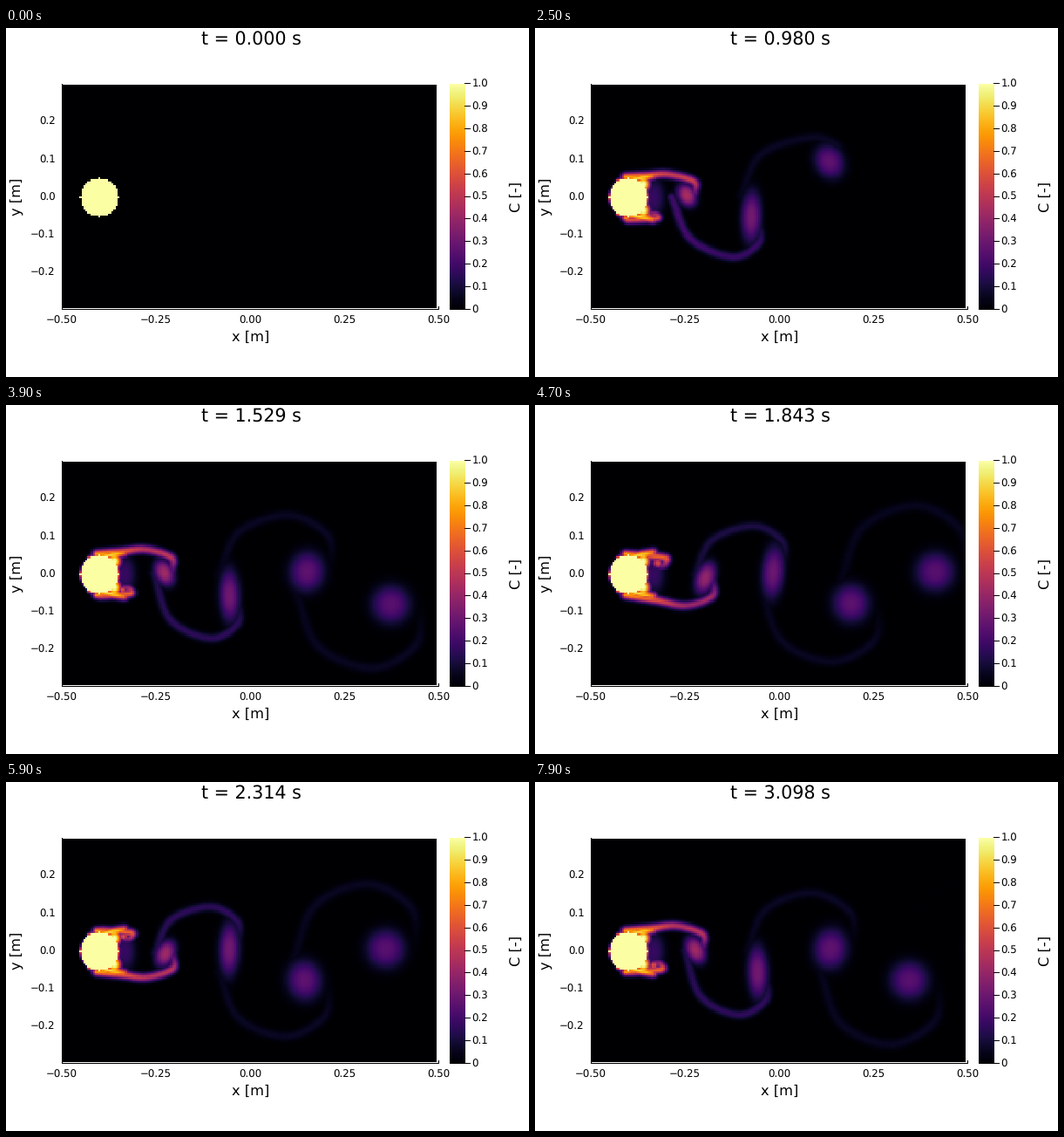
A matplotlib script for the animation above (8000 ms loop, 600x400 px).

```python
import numpy as np
import matplotlib.pyplot as plt
from matplotlib.animation import FuncAnimation

FRAMES, STEP = 80, 2 / 51
COLS, ROWS, CELL = 198, 118, 2.163
LEFT, TOP = 65.0, 65.3
CX, CY = LEFT + 19.5 * CELL, TOP + 59.5 * CELL
GX = LEFT + (np.arange(COLS) + 0.5) * CELL
GY = TOP + (np.arange(ROWS) + 0.5) * CELL
XX, YY = np.meshgrid(GX, GY)
BODY = np.round((XX - CX) / CELL) ** 2 + np.round((YY - CY) / CELL) ** 2 <= 100
GAP = np.maximum(np.hypot(XX - CX, YY - CY) - 21.5, 0)
HALO = 0.65 * np.exp(-GAP / (1.6 + 0.8 * np.tanh((XX - CX) / 12)))

FIRST, HALF_PERIOD, COUNT = 0.136, 0.257, 12
BIRTH_X, SPIN_UP = 128, 0.33


def lerp(a, b, w):
    return a + (b - a) * w


def ease(x, lo, hi):
    u = np.clip((x - lo) / (hi - lo), 0, 1)
    return u * u * (3 - 2 * u)


class Vortex:
    """Vortex n of the street; sides alternate and births are periodic."""

    def __init__(self, n):
        self.side = 1 if n % 2 == 0 else -1
        self.birth = FIRST + n * HALF_PERIOD
        self.speed = 390 - 17 * self.birth
        self.push = np.exp(-(self.birth / 0.2) ** 2)  # start-up kick

    def at(self, t):
        age = max(t - self.birth, 0)
        run = age - SPIN_UP * (1 - np.exp(-age / SPIN_UP))
        x = BIRTH_X + self.speed * run
        drift = ease(x, 170, 300)
        off = (24 * np.exp((BIRTH_X - x) / 20)
               + (18 + 60 * self.push) * drift)
        return np.array([x, CY - self.side * off + 15 * drift])


STREET = [Vortex(n) for n in range(COUNT)]


def catmull(pts, n):
    p = np.vstack([2 * pts[0] - pts[1], pts, 2 * pts[-1] - pts[-2]])
    a, b, c, d = (p[i:len(p) - 3 + i, None] for i in range(4))
    u = np.linspace(0, 1, n, endpoint=False)[None, :, None]
    q = b + 0.5 * u * (c - a + u * (2 * a - 5 * b + 4 * c - d
                                    + u * (3 * (b - c) + d - a)))
    return q.reshape(-1, pts.shape[1])


def stroke(field, pts, n=18):
    """Paint a soft line through rows of (x, y, strength, width)."""
    for x, y, a, w in catmull(np.array(pts, float), n):
        r = 3.2 * w
        i0, i1 = (max(0, int((v - LEFT) / CELL)) for v in (x - r, x + r))
        j0, j1 = (max(0, int((v - TOP) / CELL)) for v in (y - r, y + r))
        if a <= 0.003 or i0 >= COLS or j0 >= ROWS:
            continue
        gx = np.exp(-0.5 * ((GX[i0:i1 + 1] - x) / w) ** 2)
        gy = np.exp(-0.5 * ((GY[j0:j1 + 1] - y) / w) ** 2)
        part = field[j0:j1 + 1, i0:i1 + 1]
        np.maximum(part, a * gy[:, None] * gx, out=part)


def blob(field, x, y, a, w, h, tilt=0.0):
    s, c = np.sin(tilt), np.cos(tilt)
    dx, dy = XX - x, YY - y
    q = ((dx * c - dy * s) / w) ** 2 + ((dx * s + dy * c) / h) ** 2
    np.maximum(field, a * np.exp(-q ** 1.25), out=field)


def core(field, v, x, y, fade):
    """Rolled-up dye: tilted when young, tall in the middle, round when old."""
    size = 22 * (1 - np.exp((118 - x) / 75)) * (1 - 0.25 * v.push)
    tall = 1 + 0.6 * np.exp(-((x - 250) / 65) ** 2)
    amp = 0.25 + 0.35 * np.exp((135 - x) / 70)
    young = max(x - 150, 0)
    tilt = 40 * np.cos(np.pi * young / 200) * np.exp(-young / 110)
    tilt += 55 * v.push
    blob(field, x, y, amp * fade, size / tall, size * tall,
         v.side * np.radians(tilt))


def strand(field, v, x, y, up, fade):
    """Dye sheet from the body or the upstream vortex, over this one."""
    s, arch = v.side, 1 - 0.9 * v.push
    h = arch * 86 * (1 - np.exp((122 - x) / 160))
    rx = arch * (12 + 32 * ease(x, 230, 400))
    amp = 0.06 + 0.6 * np.exp(-((x - BIRTH_X) / 95) ** 2)
    amp *= 1 - ease(x, 440, 540)
    wid = 3.2 + 0.004 * (x - BIRTH_X)
    loose = ease(x, 222, 254)

    root = up + (-12, -s * 25 * ease(x, 250, 350))
    start = lerp(np.array([104, CY - s * 23]), root, loose)
    top = np.array([x - 22, y - s * h])
    mid = lerp(lerp(start, top, 0.5),
               start + (top - start) * (0.29, 0.71), loose)
    pts = [(*start, lerp(0.8, 0.8 * amp, loose), wid),
           (*mid, lerp(0.5 * (0.8 + amp), amp, loose), wid),
           (*top, amp, wid)]
    keep = 0.4 + 0.5 * np.exp((BIRTH_X - x) / 40)
    for i in range(6):
        ang, k = -0.9 + 0.65 * i, np.exp(-0.22 * i)
        pts.append((x + rx * k * np.cos(ang),
                    y + s * 0.85 * h * k * np.sin(ang),
                    amp * keep ** i, wid))
    pts = np.array(pts)
    pts[:, 2] *= fade
    stroke(field, pts)


def dye(t):
    grow = min(1, t / 0.2)
    field = HALO * grow
    blob(field, 136, CY, 0.17 * grow, 13, 22)
    for s in (1, -1):
        stroke(field, [(95, CY - s * 19, 0.6 * grow, 1.5),
                       (120, CY - s * 22, 0.9 * grow, 3.2),
                       (136, CY - s * 25, 0.68 * grow, 3.5)])
        blob(field, 124, CY - s * 15, grow, 8, 9)
    for i, v in enumerate(STREET):
        fade = np.clip((t - v.birth) / 0.08, 0, 1)
        x, y = v.at(t)
        if fade == 0 or x > 570:
            continue
        up = STREET[min(i + 1, COUNT - 1)].at(t)
        strand(field, v, x, y, up, fade)
        core(field, v, x, y, fade)
    field[BODY] = 1
    return np.clip(field, 0, 1)


plt.rcParams["font.family"] = "DejaVu Sans"
plt.rcParams["text.hinting"] = "none"
fig = plt.figure(figsize=(6, 4), dpi=100, facecolor="white")
ax = fig.add_axes([0, 0, 1, 1])


def label(x, y, s, px, ha="center", rot=0):
    return ax.text(x, y, s.replace("-0", "\u22120"), fontsize=px * 0.72,
                   ha=ha, va="baseline", rotation=rot,
                   rotation_mode="anchor", color="black")


def line(xs, ys):
    ax.plot(xs, ys, color="black", lw=0.72, solid_capstyle="butt", snap=False)


heat = ax.imshow(dye(0), cmap="inferno", vmin=0, vmax=1,
                 interpolation="nearest", aspect="auto",
                 extent=(LEFT, LEFT + COLS * CELL, TOP + ROWS * CELL, TOP))
ax.imshow(np.linspace(1, 0, 256)[:, None], cmap="inferno", vmin=0, vmax=1,
          aspect="auto", extent=(509, 527, 323, 64))

line([64.5, 64.5], [64, 323])
line([64, 497], [322.5, 322.5])
line([496.5, 496.5], [319, 323])
for k in range(-2, 3):
    label(280.1 + 108.1 * k, 339.3, f"{k / 4:.2f}", 11.8)
    label(56.5, 197.7 - 43.25 * k, f"{k / 10:.1f}", 11.8, "right")
for k in range(11):
    y = 322.5 - 25.9 * k
    line([526, 533], [np.floor(y) + 0.5] * 2)
    label(534.7, y + 4.3, f"{k / 10:.1f}" if k else "0", 11.8, "left")
label(280.5, 359, "x [m]", 16.2)
label(16.5, 193.5, "y [m]", 16.2, rot=90)
label(589.5, 193.5, "C [-]", 16.2, rot=90)
title = label(281, 18.4, "t = 0.000 s", 20.6)

ax.set_xlim(0, 600)
ax.set_ylim(400, 0)
ax.axis("off")


def draw(k):
    t = k * STEP
    heat.set_data(dye(t))
    title.set_text(f"t = {t:.3f} s")
    return heat, title


anim = FuncAnimation(fig, draw, frames=FRAMES, interval=100, repeat=True,
                     repeat_delay=0, blit=False)
plt.show()
```
